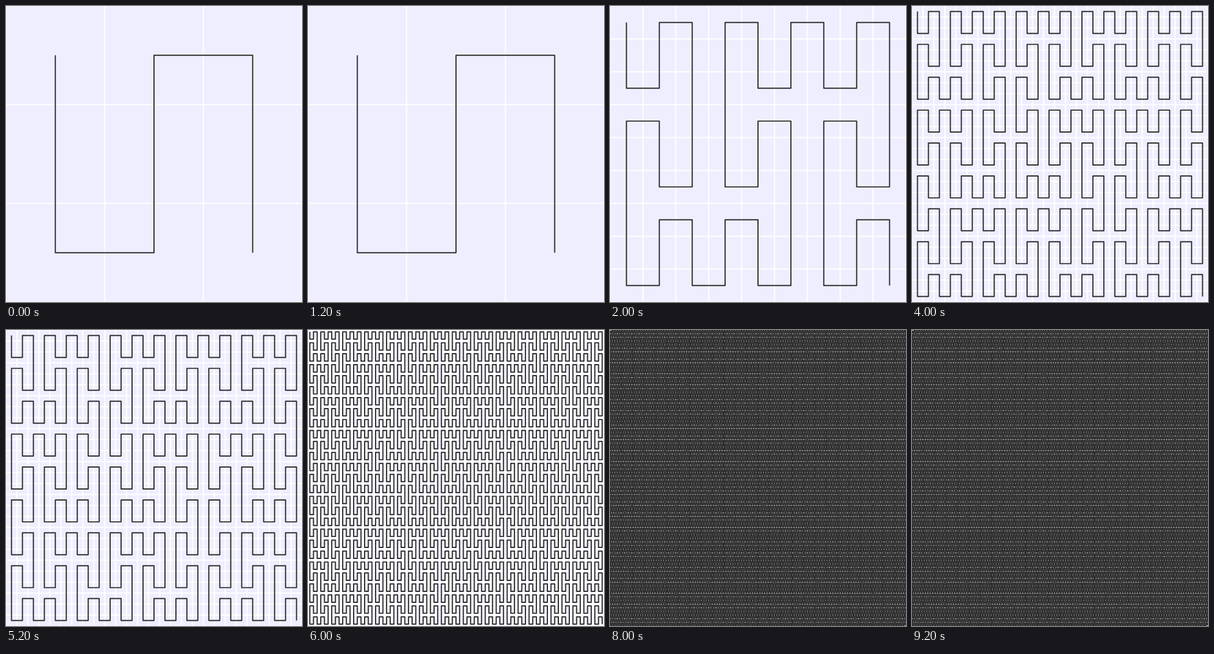
Animation of 512x512 px, one loop 10000 ms. Source, as an HTML page with a canvas:

```html
<!DOCTYPE html>
<html lang="en">
<head>
<meta charset="utf-8">
<title>Peano curve</title>
<style>
  html, body { margin: 0; height: 100%; overflow: hidden; }
  canvas { display: block; width: 512px; height: 512px; }
</style>
</head>
<body>
<canvas id="stage" width="512" height="512"></canvas>
<script>
const SIZE = 512, HOLD = 2000, ORDERS = 5;
const ctx = document.getElementById('stage').getContext('2d');

// Visits the cells of a square in Peano order; flips mirror each sub-square.
function peano(order, x, y, flipX, flipY, visit) {
  if (order === 0) return visit(x, y);
  const part = 3 ** (order - 1);
  for (let i = 0; i < 3; i++) {
    for (let k = 0; k < 3; k++) {
      const j = i % 2 ? 2 - k : k;
      const col = flipX ? 2 - i : i;
      const row = flipY ? 2 - j : j;
      peano(order - 1, x + col * part, y + row * part,
        flipX !== (j === 1), flipY !== (i === 1), visit);
    }
  }
}

function draw(order) {
  const count = 3 ** order, cell = SIZE / count;
  ctx.fillStyle = '#eef';
  ctx.fillRect(0, 0, SIZE, SIZE);

  ctx.fillStyle = '#fff';
  for (let i = 0; i <= count; i++) {
    ctx.fillRect(i * cell - 1, 0, 2, SIZE);
    ctx.fillRect(0, i * cell - 1, SIZE, 2);
  }

  ctx.beginPath();
  peano(order, 0, 0, false, false,
    (x, y) => ctx.lineTo((x + 0.5) * cell, (y + 0.5) * cell));
  ctx.strokeStyle = '#282828';
  ctx.lineWidth = 1.95;
  ctx.lineJoin = 'round';
  ctx.stroke();
}

let shown = 0;
function tick() {
  const order = 1 + Math.floor(performance.now() / HOLD) % ORDERS;
  if (order !== shown) draw(shown = order);
  requestAnimationFrame(tick);
}
tick();
</script>
</body>
</html>
```
